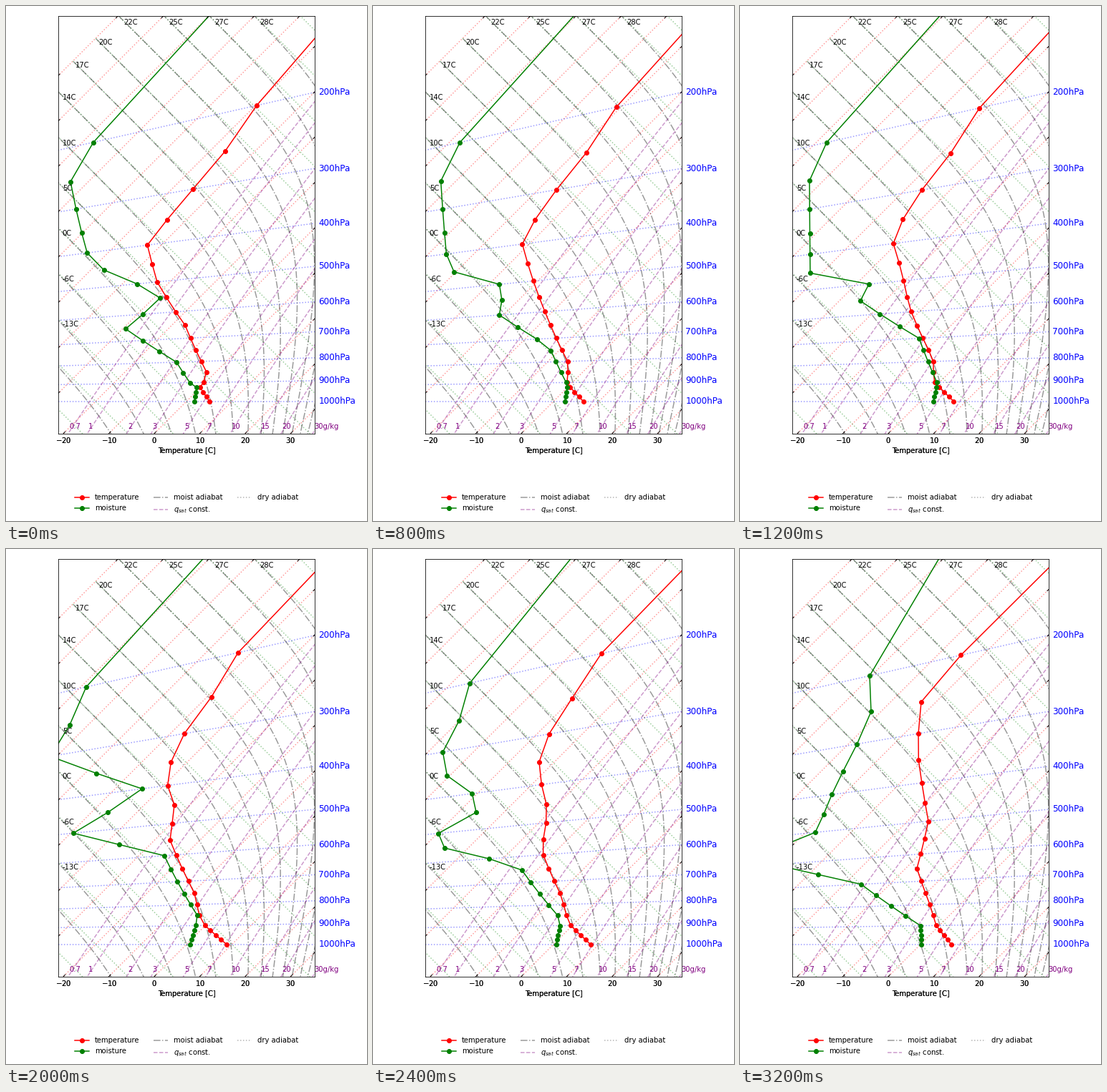
Animation, 504 px wide and 720 px high, one loop 3.6 s. Source, as a matplotlib script:

```python
import numpy as np
import matplotlib.pyplot as plt
from matplotlib.animation import FuncAnimation

W, H = 504, 720
KAPPA, KELVIN = 2 / 7, 273.15
STEPS = 9

# The chart spans -40..40 by -10..120 in rotated (temperature, theta) axes.
UNIT = 4.486
LEFT, TOP = 72.55, 14.4
RIGHT, BOTTOM = LEFT + 80 * UNIT, TOP + 130 * UNIT
X0, Y0 = LEFT + 40 * UNIT, BOTTOM - 10 * UNIT
SCALE = UNIT / np.sqrt(2)

LEVELS = np.array([1000, 975, 950, 925, 900, *range(850, 199, -50), 100])

plt.rcParams.update({"font.family": "DejaVu Sans", "font.size": 10})

# Corners of each profile as (level index, x), at a few steps of the loop.
TEMPERATURE = {
    0: [(0, 284), (3, 271), (5, 280), (9, 250), (12, 211), (14.2, 196), (16, 261)],
    5: [(0, 308), (5, 270), (7, 263), (11, 229), (13, 235), (14.5, 221), (16, 249)],
    8: [(0, 295), (4, 274), (6, 265), (9, 247), (12, 263), (15.5, 247), (17, 253)],
}
MOISTURE = {
    0: [(0, 263), (3, 266), (6, 238), (9, 167), (11.2, 220), (13.4, 118), (17, 90), (18, 122)],
    3: [(0, 270), (4, 275), (8, 250), (11, 168), (12, 180), (13, 98), (17, 97), (18, 121)],
    5: [(0, 257), (5, 267), (10, 221), (12, 94), (14, 190), (16, 62), (17, 89), (18, 112)],
    8: [(0, 253), (4, 252), (8, 169), (10.6, 12), (12, 105), (14.5, 134), (17, 183), (18, 181)],
}


def chart(t, theta):
    """Pixel position of temperature and potential temperature in C."""
    return X0 + SCALE * (theta + t), Y0 - SCALE * (theta - t)


def isobar_y(x, p):
    k = (1000 / p) ** KAPPA
    return Y0 - (x - X0 + 2 * KELVIN * SCALE) * (k - 1) / (k + 1)


def theta_of(t, p):
    return (t + KELVIN) * (1000 / p) ** KAPPA - KELVIN


def theta_e(t, p):
    e = 6.112 * np.exp(17.67 * t / (t + 243.5))
    r = 0.622 * e / np.maximum(p - e, 1e-3)
    heat = np.minimum(2565 * r / (t + KELVIN), 5)
    return (theta_of(t, p) + KELVIN) * np.exp(heat) - KELVIN


def moist_temperature(level, p):
    """Temperature at which saturated air at p has theta_e = level."""
    lo, hi = np.full_like(p, -150), np.full_like(p, 60)
    for _ in range(40):
        mid = (lo + hi) / 2
        warm = theta_e(mid, p) > level
        lo, hi = np.where(warm, lo, mid), np.where(warm, mid, hi)
    return lo


def moist_adiabat(level):
    p = np.geomspace(50, 1250, 300)
    t = moist_temperature(level, p)
    keep = t >= -100
    return chart(t[keep], theta_of(t[keep], p[keep]))


def saturation_line(q):
    p = np.geomspace(150, 1250, 200)
    e = q * p / (0.622 + 0.378 * q)
    u = np.log(e / 6.112)
    t = 243.5 * u / (17.67 - u)
    return chart(t, theta_of(t, p))


fig = plt.figure(figsize=(W / 72, H / 72), dpi=72, facecolor="white")
ax = fig.add_axes([LEFT / W, 1 - BOTTOM / H, (RIGHT - LEFT) / W, (BOTTOM - TOP) / H])
ax.set(xlim=(LEFT, RIGHT), ylim=(BOTTOM, TOP), xticks=[], yticks=[])


def tick(x, y, inward):
    d = 2.5 * inward
    ax.plot([x, x + d], [y, y - d], color="k", lw=1, zorder=3)


def bottom_x(t):
    return chart(t, t - 10 * np.sqrt(2))[0]


def draw_grid():
    faint = dict(ls=":", lw=1.5, alpha=0.4)
    for t in range(-100, 40, 10):
        ax.plot(*chart(t, np.array([-60, 180])), color="red", **faint)
        x = bottom_x(t)
        start = max(x, LEFT)
        end = min(x + BOTTOM - TOP, RIGHT)
        tick(start, BOTTOM - (start - x), 1)
        tick(end, BOTTOM - (end - x), -1)
    for theta in range(-30, 120, 10):
        ax.plot(*chart(np.array([-100, 60]), theta), color="green", **faint)
    for p in range(200, 1001, 100):
        ends = np.array([LEFT, RIGHT])
        ax.plot(ends, isobar_y(ends, p), color="blue", **faint)
        ax.text(RIGHT + 5, isobar_y(RIGHT, p), f"{p}hPa",
                color="blue", size=12, va="center")


def draw_moist_adiabats():
    root2 = np.sqrt(2)
    for theta in range(-20, 110, 10):
        ax.plot(*moist_adiabat(theta), color="k", ls="-.", lw=1.5, alpha=0.4)
        if theta < -10:
            continue
        # Label just inside the point where the line enters the chart.
        t = max(-100, theta - 120 * root2 + 0.75, -40 * root2 - theta + 0.75)
        x, y = chart(t, theta)
        name = round(float(moist_temperature(theta, np.array([1000.0]))[0]))
        ax.text(x + 3.8, y + 9.2, f"{name}C")


def draw_saturation_lines():
    for q in (0.7, 1, 2, 3, 5, 7, 10, 15, 20, 30):
        x, y = saturation_line(q / 1000)
        ax.plot(x[::-1], y[::-1], color="purple", ls="--", lw=1.5, alpha=0.4)
        unit = "g/kg" if q == 30 else ""
        ax.text(np.interp(BOTTOM, y, x) + 1.6, 591, f"{q}{unit}", color="purple")


def draw_axis_labels():
    # Two passes give the heavier look of the overlaid axes.
    for _ in range(2):
        for t in range(-20, 40, 10):
            ax.text(bottom_x(t), 610.8, rf"$\mathdefault{{{t}}}$", ha="center")
        ax.text((LEFT + RIGHT) / 2, 625.2, "Temperature [C]", ha="center")


def draw_legend():
    dot = dict(marker="o", markevery=[1])
    entries = [
        (96, 687, "temperature", dict(color="red", **dot)),
        (96, 702, "moisture", dict(color="green", **dot)),
        (206.4, 687, "moist adiabat", dict(color="k", ls="-.", alpha=0.4)),
        (206.4, 704, "$q_{sat}$ const.", dict(color="purple", ls="--", alpha=0.4)),
        (323, 687, "dry adiabat", dict(color="k", ls=":", alpha=0.3)),
    ]
    for x, y, text, style in entries:
        ax.plot([x, x + 10, x + 20], [y] * 3, lw=1.5, clip_on=False, **style)
        ax.text(x + 28, y + 3.2, text)


draw_grid()
draw_moist_adiabats()
draw_saturation_lines()
draw_axis_labels()
draw_legend()

style = dict(marker="o", ms=6, lw=1.5, zorder=2.5)
temp_line, = ax.plot([], [], color="red", **style)
dew_line, = ax.plot([], [], color="green", **style)


def corners(keys, step):
    """Blend the corner points between the neighbouring key steps."""
    poses = np.array(list(keys.values()), float)
    flat = poses.reshape(len(keys), -1)
    return np.array([np.interp(step, list(keys), c) for c in flat.T]).reshape(-1, 2)


def show(line, points):
    x = np.interp(np.arange(len(LEVELS)), *np.transpose(points))
    line.set_data(x, isobar_y(x, LEVELS))


def update(step):
    top = len(LEVELS) - 1
    show(temp_line, [*corners(TEMPERATURE, step), (top - 1, 350 - 5.2 * step), (top, 550)])
    show(dew_line, [*corners(MOISTURE, step), (top, 311 - 2.4 * step)])
    return temp_line, dew_line


anim = FuncAnimation(fig, update, frames=STEPS, interval=3600 / STEPS, repeat=True,
                     repeat_delay=0, init_func=lambda: update(0))
plt.show()
```
